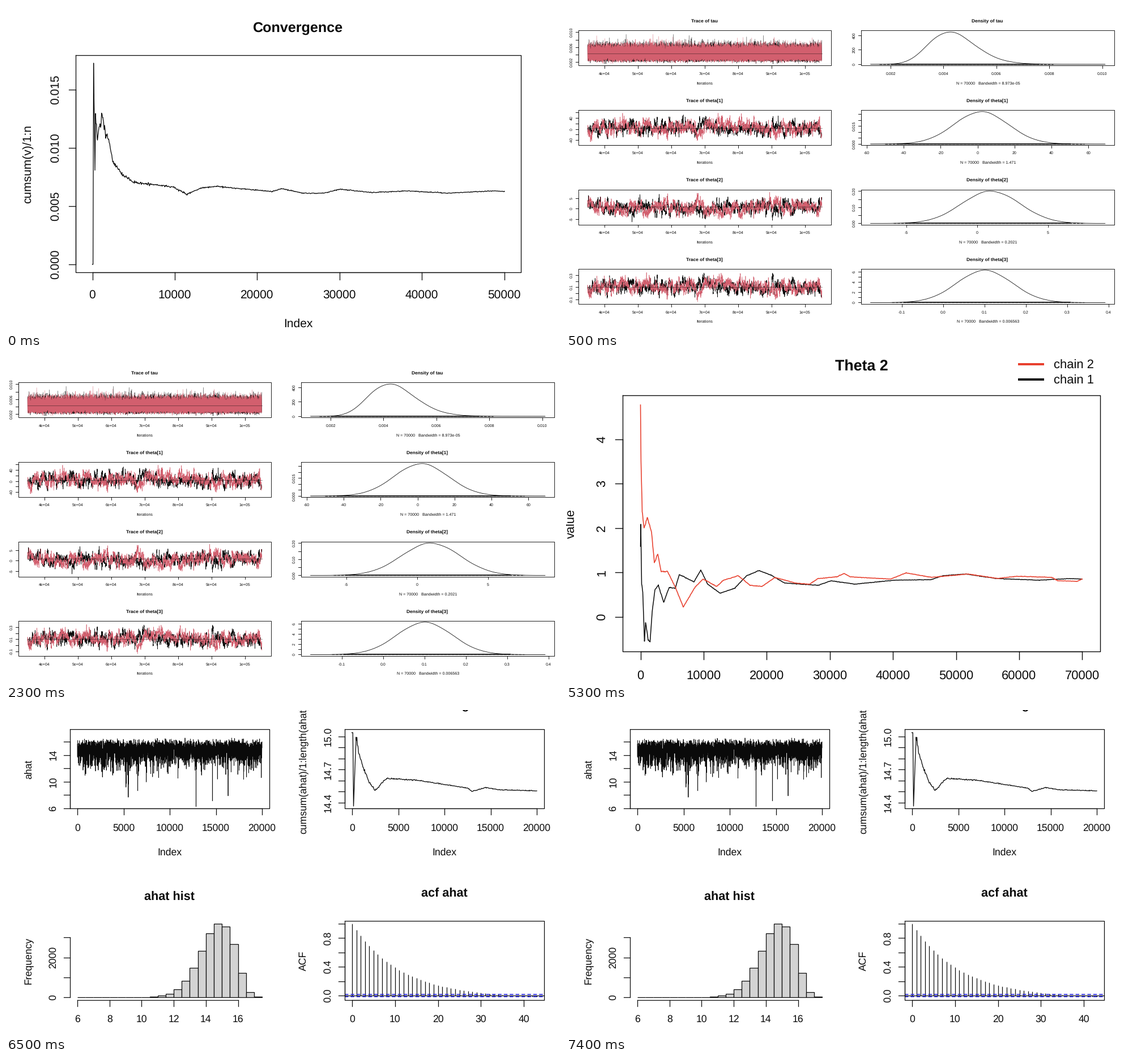
Recreate the animation shown at these times as a matplotlib script. Size 978 by 573 pixels, loop 8000 ms.

```python
import numpy as np
import matplotlib.pyplot as plt
from matplotlib.animation import FuncAnimation

W, H = 978, 573
INTERVAL = 500
STARTS = [0, 500, 3500, 6500]
INK = "#0a0a0a"
ROSE = "#d25f6e"
RED = "#e8412f"

plt.rcParams["font.family"] = "Liberation Sans"
plt.rcParams["text.hinting"] = "none"

# At 72 dpi one point is one pixel; the tiny margin guards against rounding down.
fig = plt.figure(figsize=((W + 0.001) / 72, (H + 0.001) / 72), dpi=72, facecolor="white")


def new_scene():
    ax = fig.add_axes([0, 0, 1, 1])
    ax.set_xlim(0, W)
    ax.set_ylim(H, 0)
    ax.set_autoscale_on(False)
    ax.axis("off")
    return ax


def label(ax, x, y, s, size, bold=False, turn=False, ha="center"):
    """Text whose capitals are centred on (x, y) across the baseline."""
    drop = 0.35 * size
    x, y = (x + drop, y) if turn else (x, y + drop)
    ax.text(x, y, s, fontsize=size, ha=ha, va="baseline", color=INK,
            weight="bold" if bold else "normal",
            rotation=90 if turn else 0, rotation_mode="anchor")


def line(ax, xs, ys, lw, color=INK, **kw):
    ax.plot(xs, ys, color=color, lw=lw, solid_joinstyle="round", **kw)


def ticks(start, step, names):
    """Evenly spaced (position, name) pairs; names are comma separated."""
    return [(start + i * step, s) for i, s in enumerate(names.split(","))]


def x_axis(ax, y, marks, length, gap, size, lw):
    line(ax, [marks[0][0], marks[-1][0]], [y, y], lw)
    for x, s in marks:
        line(ax, [x, x], [y, y + length], lw)
        label(ax, x, y + gap, s, size)


def y_axis(ax, x, marks, length, gap, size, lw):
    line(ax, [x, x], [marks[0][0], marks[-1][0]], lw)
    for y, s in marks:
        line(ax, [x - length, x], [y, y], lw)
        label(ax, x - gap, y, s, size, turn=True)


def box(ax, x0, y0, x1, y1, lw):
    line(ax, [x0, x1, x1, x0, x0], [y0, y0, y1, y1, y0], lw)


def running_mean(keys, gain, start, seed):
    """Path through key points whose roughness fades like 1/n after start."""
    kx, ky = np.array(keys).T
    xs = np.union1d(np.arange(kx[0], kx[-1], 0.9), kx)
    rough = np.where(xs > start, gain / (np.abs(xs - start) + 6) + 0.2, 0)
    rough[np.isin(xs, kx)] = 0
    noise = np.random.default_rng(seed).normal(size=xs.size)
    return xs, np.interp(xs, kx, ky) + rough * noise


def envelope(values, x0, x1, columns):
    """Dense series reduced to alternating column extremes."""
    rows = values.reshape(columns, -1)
    ys = np.column_stack([rows.min(1), rows.max(1)]).ravel()
    return np.linspace(x0, x1, ys.size), ys


def autoregress(rng, shape, rho):
    e = rng.normal(size=shape)
    for i in range(1, shape[0]):
        e[i] = rho * e[i - 1] + np.sqrt(1 - rho * rho) * e[i]
    return e


def convergence():
    ax = new_scene()
    keys = [(152.5, 457), (153.6, 457), (154.6, 101), (157, 286), (158, 190),
            (161, 235), (166, 210), (171, 197), (176, 227), (181, 236),
            (189, 276), (205, 298), (226, 312), (268, 317), (295, 320),
            (319, 333), (345, 322), (372, 319), (412, 323), (470, 328),
            (486, 323), (525, 331), (560, 331), (590, 324), (648, 330),
            (705, 327), (780, 331), (862, 327), (880, 328)]
    line(ax, *running_mean(keys, 95, 155, 1), 1.3)
    box(ax, 123, 87, 909, 471, 1.3)
    x_axis(ax, 471, ticks(152.5, 145.4, "0,10000,20000,30000,40000,50000"), 13, 38.5, 21, 1.3)
    y_axis(ax, 123, ticks(457, -103, "0.000,0.005,0.010,0.015"), 12, 37, 21, 1.3)
    label(ax, 515.5, 36.5, "Convergence", 25.1, bold=True)
    label(ax, 515.5, 560, "Index", 21)
    label(ax, 36.5, 279.5, "cumsum(v)/1:n", 21, turn=True)
    return ax


def trace_tau(ax, rng):
    for color in (INK, ROSE):
        tau = rng.gamma(23, 0.0043 / 23, 70000)
        xs, ys = envelope(99.5 - (tau - 0.002) * 6650, 38, 451.5, 875)
        line(ax, xs, ys, 0.45, color)


def trace_theta(ax, rng, slow, mid, scale):
    n = len(slow)
    z = 0.8 * slow + 0.6 * autoregress(rng, (n, 2), 0.6)
    for k, color in enumerate((INK, ROSE)):
        line(ax, np.linspace(38, 451.5, n), mid - scale * np.clip(z[:, k], -3.4, 3.4),
             0.6, color)


def density(ax, floor, peak, spread, rug, skewed):
    px, py = peak
    xs = np.linspace(537.5, 951.5, 400)
    if skewed:
        v = 1 + (xs - px) / 197
        shape = np.exp(23 * (np.log(v) - v + 1))
    else:
        shape = np.exp(-((xs - px) / spread) ** 2 / 2)
    ripple = 0.5 * np.sin(xs / 8) * shape
    line(ax, [537.5, 951.5], [floor, floor], 0.6, "#888888")
    line(ax, xs, floor - (floor - py) * shape + ripple, 0.8)
    a, b = rug
    line(ax, [a, b], [floor, floor], 1.8)
    line(ax, [a - 22, b + 25], [floor, floor], 1.2, dashes=(4, 1.5))


def trace_and_density():
    ax = new_scene()
    rng = np.random.default_rng(5)
    thin, small = 0.9, 7
    slow = autoregress(rng, (3500, 2), 0.97)
    iterations = ",".join(f"{k}e+04" for k in range(4, 10)) + ",1e+05"
    rows = [
        dict(name="tau", bandwidth="8.973e-05", mid=84,
             left=ticks(99.5, -13.3, "0.002,,0.006,,0.010"),
             below=ticks(573, 93.4, "0.002,0.004,0.006,0.008,0.010"),
             right=ticks(103, -25.6, "0,200,400"),
             peak=(677, 46), spread=0, rug=(575, 835)),
        dict(name="theta[1]", bandwidth="1.471", mid=216, sign=1,
             left=ticks(237, -9.7, "-40,,0,,40,"),
             below=ticks(531, 65.2, "-60,-40,-20,0,20,40,60"),
             right=ticks(244, -10.6, "0.000,,,0.015,,"),
             peak=(733, 187), spread=48, rug=(585, 890)),
        dict(name="theta[2]", bandwidth="0.2021", mid=355.5, sign=-1,
             left=ticks(377, -18.5, "-5,0,5"),
             below=ticks(601, 125, "-5,0,5"),
             right=ticks(384.5, -14.3, "0.00,,0.10,,0.20"),
             peak=(750, 327.5), spread=52, rug=(600, 890)),
        dict(name="theta[3]", bandwidth="0.006563", mid=497, sign=1,
             left=ticks(519, -10.75, "-0.1,,0.1,,0.3"),
             below=ticks(593, 73, "-0.1,0.0,0.1,0.2,0.3,0.4"),
             right=ticks(524.5, -9.1, "0,,2,,4,,6"),
             peak=(739, 467.5), spread=49, rug=(597, 890)),
    ]
    for i, row in enumerate(rows):
        dy = i * 140.65
        top, bottom, mid = 43.5 + dy, 105.5 + dy, row["mid"]

        if i == 0:
            trace_tau(ax, rng)
        else:
            trace_theta(ax, rng, row["sign"] * slow, mid, 7.8)
        line(ax, [38, 451.5], [mid, mid], 0.8, alpha=0.5)
        box(ax, 21.5, top, 468, bottom, thin)
        x_axis(ax, bottom, ticks(67.5, 59, iterations), 4.5, 13.7, small, thin)
        y_axis(ax, 21.5, row["left"], 4.5, 12.5, small, thin)
        label(ax, 244.5, 26.3 + dy, "Trace of " + row["name"], 8.35, bold=True)
        label(ax, 244.5, 136 + dy, "Iterations", small)

        density(ax, row["right"][0][0], row["peak"], row["spread"], row["rug"], i == 0)
        box(ax, 520.5, top, 967.5, bottom, thin)
        x_axis(ax, bottom, row["below"], 4.5, 13.7, small, thin)
        y_axis(ax, 520.5, row["right"], 4.5, 12.5, small, thin)
        label(ax, 744, 26.3 + dy, "Density of " + row["name"], 8.35, bold=True)
        label(ax, 745, 136 + dy, "N = 70000   Bandwidth = " + row["bandwidth"], 7.1)
    return ax


def two_chains():
    ax = new_scene()
    black = [(131.5, 333), (132, 294), (133.5, 400), (135.5, 414), (138.5, 501),
             (140.5, 468), (145, 499), (148.5, 502), (152, 450), (157, 410),
             (163, 402), (172.5, 432), (182, 406), (193, 407), (200, 383),
             (226, 396), (238, 375), (250, 400), (272, 416), (298, 407),
             (319, 385), (341, 376), (362, 384), (386, 398), (445, 402),
             (468, 394), (510, 400), (580, 393), (645, 392), (665, 385),
             (705, 382), (760, 390), (835, 393), (890, 390), (911, 391)]
    red = [(131.5, 83), (132.3, 178), (134.5, 272), (138, 300), (143.5, 282),
           (151, 308), (156, 362), (162, 347), (168, 378), (179, 377),
           (193, 405), (207, 440.5), (228, 405), (242, 391), (266, 404),
           (278, 393), (304, 385), (325, 402), (346, 404), (369, 388),
           (404, 398), (430, 400), (445, 390), (478, 387), (491, 381),
           (502, 387), (573, 391), (600, 380), (645, 388), (710, 382),
           (762, 390), (795, 386), (858, 388), (868, 394), (902, 395), (911, 391)]
    line(ax, *running_mean(black, 12, 134, 7), 1.5)
    line(ax, *running_mean(red, 12, 134, 8), 1.6, RED)
    box(ax, 100, 66, 942.5, 519, 1.4)
    x_axis(ax, 519, ticks(131.5, 111.4, "0,10000,20000,30000,40000,50000,60000,70000"),
           14, 41, 22, 1.4)
    y_axis(ax, 100, ticks(458, -78.6, "0,1,2,3,4"), 13, 38.5, 22, 1.4)
    label(ax, 522, 12, "Theta 2", 26.8, bold=True)
    label(ax, 8, 293, "value", 21.8, turn=True)
    for y, color, name in ((11.5, RED, "chain 2"), (38, INK, "chain 1")):
        line(ax, [800, 842], [y, y], 4, color)
        label(ax, 861, y, name, 22, ha="left")
    return ax


def four_panels():
    ax = new_scene()
    lw, size = 1.25, 17.6
    rng = np.random.default_rng(11)
    index = "0,5000,10000,15000,20000"

    # sample path with a long lower tail and three rare dips
    z = autoregress(rng, (20000,), 0.9)
    ahat = 17.6 - 2.8 * np.exp(0.29 * z)
    xs, ys = envelope(174 - (ahat - 6) * 11.8, 126, 452, 800)
    line(ax, xs, ys, 0.8)
    for x, depth in ((232, 142), (335, 170), (363.5, 160)):
        line(ax, [x, x], [75, depth], 1.2)
    box(ax, 113, 34.5, 465, 174.5, lw)
    x_axis(ax, 174.5, ticks(126, 81.5, index), 11, 33.5, size, lw)
    y_axis(ax, 113, ticks(174, -23.6, "6,,10,,14,"), 11, 31, size, lw)
    label(ax, 288.5, 251, "Index", size)
    label(ax, 39, 104.5, "ahat", size, turn=True)

    # running mean
    mean = [(610.5, 40), (612.3, 40), (613.5, 170), (618, 48), (622, 71),
            (630, 101), (640, 125), (651, 142), (672, 121), (724, 124),
            (815, 138), (822, 144), (847, 137), (870, 141), (937, 143)]
    line(ax, *running_mean(mean, 35, 617, 12), 1.3)
    box(ax, 598, 34.5, 950, 174.5, lw)
    x_axis(ax, 174.5, ticks(611, 81.5, index), 11, 33.5, size, lw)
    y_axis(ax, 598, ticks(164, -19.5, "14.4,,,14.7,,,15.0"), 11, 31, size, lw)
    label(ax, 774, -9.6, "ahat avg", 21.6, bold=True)
    label(ax, 774, 251, "Index", size)
    label(ax, 523.5, 106, "cumsum(ahat)/1:length(ahat)", size, turn=True)

    # histogram: long left tail, steep right side
    d = np.arange(6.25, 17.5, 0.5) - 14.75
    fall = np.where(d < 0, (np.abs(d) / 1.57) ** 1.7, (np.abs(d) / 1.45) ** 3)
    step = 14.175
    ax.bar(126 + step * np.arange(d.size), -130 * np.exp(-fall), step,
           bottom=508, align="edge", color="#d3d3d3", edgecolor=INK, lw=lw)
    x_axis(ax, 513.5, ticks(126, 56.7, "6,8,10,12,14,16"), 11, 32.5, size, lw)
    y_axis(ax, 113, ticks(508, -35.2, "0,,2000,"), 11, 31, size, lw)
    label(ax, 288.5, 329, "ahat hist", 21.6, bold=True)
    label(ax, 39, 443.5, "Frequency", size, turn=True)

    # autocorrelation
    lag = np.arange(44)
    acf = 0.913 ** lag - 0.0009 * lag
    ax.vlines(611 + 7.58 * lag, 505, 505 - 127 * acf, color=INK, lw=lw)
    line(ax, [598, 950], [505, 505], lw)
    for y in (503.2, 506.8):
        line(ax, [598, 950], [y, y], 1.6, "#1a1ae0", dashes=(4, 2.5))
    box(ax, 598, 373, 950, 513.5, lw)
    x_axis(ax, 513.5, ticks(611, 75.8, "0,10,20,30,40"), 11, 32.5, size, lw)
    y_axis(ax, 598, ticks(505, -25.4, "0.0,,0.4,,0.8,"), 11, 31, size, lw)
    label(ax, 774, 323, "acf ahat", 21.6, bold=True)
    label(ax, 523.5, 443.5, "ACF", size, turn=True)
    return ax


scenes = [convergence(), trace_and_density(), two_chains(), four_panels()]


def update(i):
    current = sum(i * INTERVAL >= s for s in STARTS) - 1
    for k, ax in enumerate(scenes):
        ax.set_visible(k == current)
    return scenes


anim = FuncAnimation(fig, update, frames=16, interval=INTERVAL, repeat=True, repeat_delay=0)
plt.show()
```
